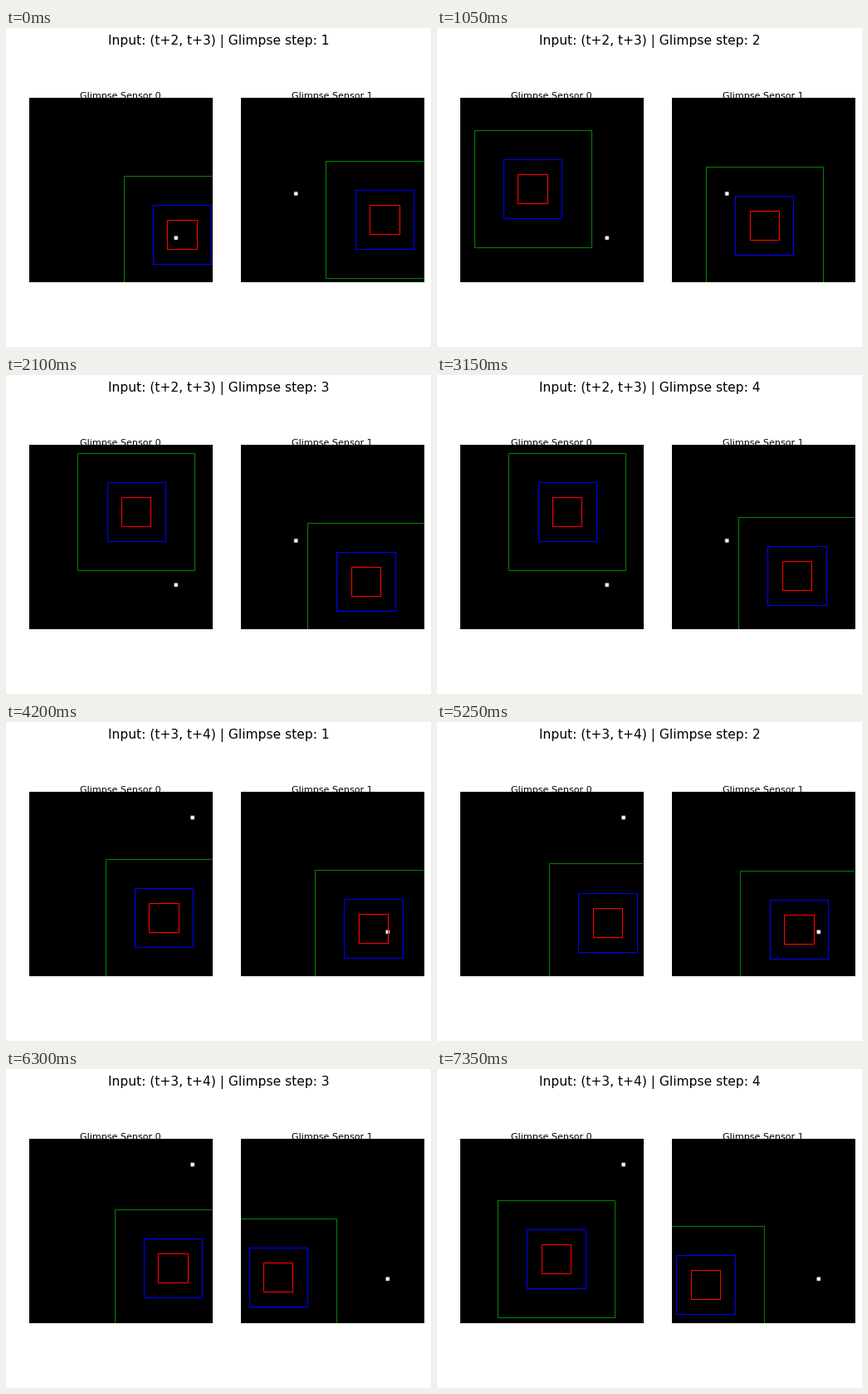
These frames come from a looping animation (512x384 px, 8 s). A matplotlib script:

```python
import numpy as np
import matplotlib.pyplot as plt
from matplotlib.animation import FuncAnimation
from matplotlib.patches import Rectangle

W, H, DPI = 512, 384, 80
INTERVAL, LOOP, HOLD = 50, 8000, 1050
STEPS = 4
GRID = 100
LEFT, PITCH, BOTTOM = 27.8, 255, 78.49
WIDTH, HEIGHT = 220.5, 221.015
COLORS = ("red", "blue", "green")

# The dot's track: sensor 1 sees one place, sensor 0 the next
TRACK = ((30, 52), (80, 76), (89, 14))

# Where each sensor looks, step by step, in grid units
GAZE = (
    ((83.6, 74.2), (39.6, 49.2), (58.5, 36.2), (58.5, 36.2),
     (73.6, 68.2), (80.5, 70.9), (78.6, 70.1), (52.5, 65.1)),
    ((78.5, 66.1), (50.5, 69.2), (68.3, 74.2), (68.3, 71.0),
     (72.4, 74.2), (69.5, 74.8), (20.4, 75.1), (18.5, 79.2)),
)


def scene(place):
    x, y = TRACK[place]
    img = np.zeros((GRID, GRID))
    img[y - 1:y + 1, x - 1:x + 1] = 1
    return img


class Sensor:
    def __init__(self, fig, index):
        self.index = index
        left = LEFT + index * PITCH
        ax = fig.add_axes((left / W, BOTTOM / H, WIDTH / W, HEIGHT / H))
        self.image = ax.imshow(scene(0), cmap="gray", vmin=0, vmax=1,
                               extent=(0, GRID, GRID, 0), aspect="auto")
        ax.axis("off")
        ax.set_title(f"Glimpse Sensor {index}", fontsize=10, y=1, pad=-0.1)
        # Each glimpse is twice as wide as the one inside it
        self.boxes = [
            ax.add_patch(Rectangle((0, 0), 16 * 2**k, 16 * 2**k,
                                   fill=False, ec=color, lw=1))
            for k, color in enumerate(COLORS)
        ]

    def show(self, step):
        self.image.set_data(scene(step // STEPS + 1 - self.index))
        cx, cy = GAZE[self.index][step]
        for box in self.boxes:
            half = box.get_width() / 2
            box.set_xy((cx - half, cy - half))


plt.rcParams["font.family"] = "DejaVu Sans"
plt.rcParams["text.kerning_factor"] = 6
fig = plt.figure(figsize=(W / DPI, H / DPI), dpi=DPI, facecolor="white")
heading = fig.suptitle("", fontsize=14)
sensors = [Sensor(fig, i) for i in range(2)]


def update(frame):
    step = frame * INTERVAL // HOLD
    t = 2 + step // STEPS
    heading.set_text(
        f"Input: (t+{t}, t+{t + 1}) | Glimpse step: {step % STEPS + 1}")
    for sensor in sensors:
        sensor.show(step)
    return []


anim = FuncAnimation(fig, update, frames=LOOP // INTERVAL, interval=INTERVAL,
                     init_func=lambda: update(0), repeat=True, repeat_delay=0)
plt.show()
```
